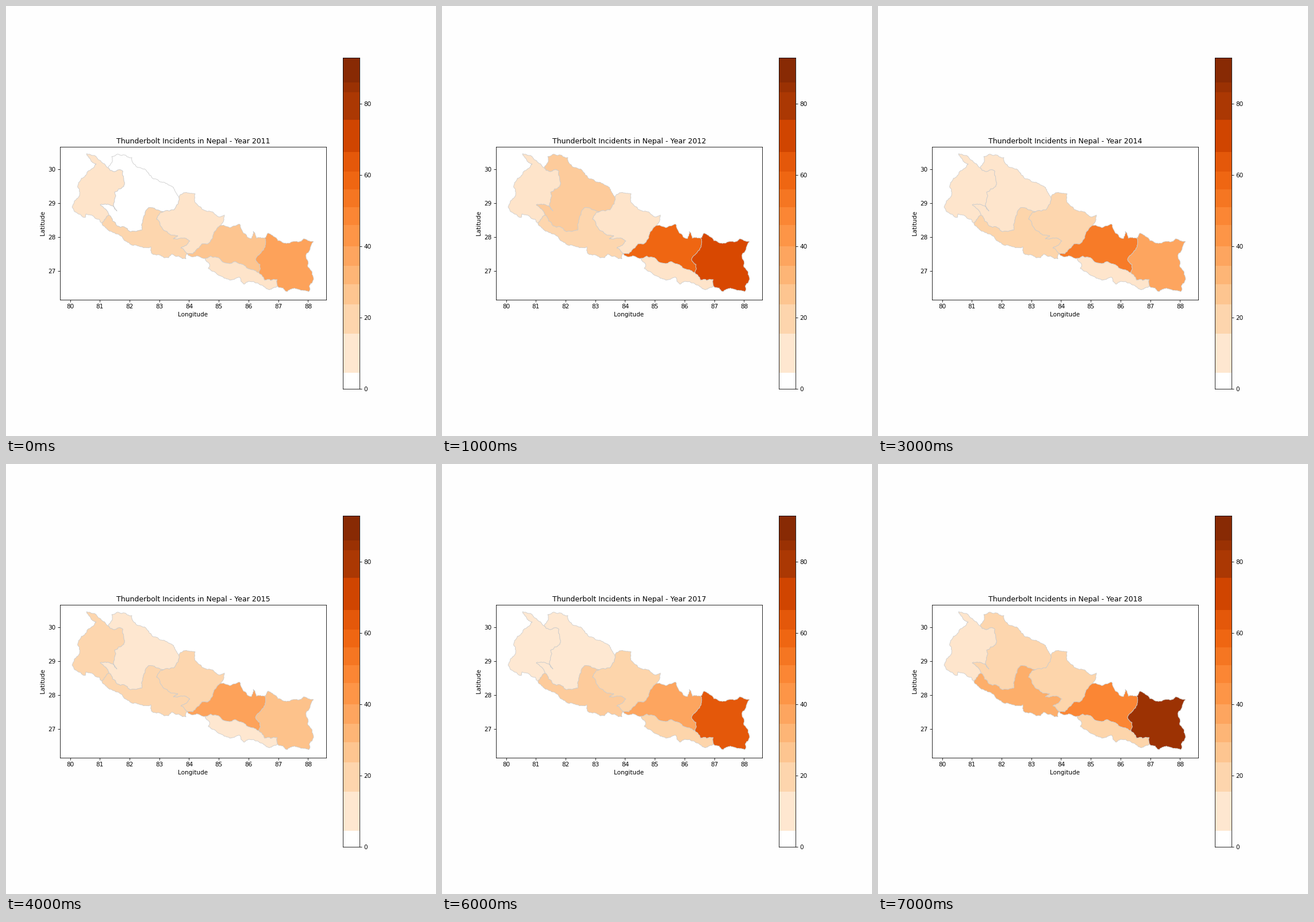
These frames come from a looping animation (748 px wide and 748 px high, 8000 ms). A matplotlib script:

```python
import numpy as np
import matplotlib.pyplot as plt
from matplotlib.animation import FuncAnimation
from matplotlib.patches import Polygon, Rectangle

VMAX = 93
rng = np.random.default_rng(7)
oranges = plt.get_cmap("Oranges")


def border(*points):
    """Roughen a line through a few key points by fractal midpoint shifts."""
    pts = np.array(points, float)
    for _ in range(4):
        step = np.diff(pts, axis=0)
        normal = np.column_stack([-step[:, 1], step[:, 0]])
        shift = rng.uniform(-0.16, 0.16, (len(step), 1))
        out = np.empty((2 * len(pts) - 1, 2))
        out[::2] = pts
        out[1::2] = pts[:-1] + step / 2 + normal * shift
        pts = out
    return pts


def geo(pts):
    """Stage pixels to longitude and latitude."""
    return np.column_stack([80 + (pts[:, 0] - 111.5) / 51.75,
                            30 - (pts[:, 1] - 284.4) / 58.82])


def ring(*lines):
    """Join borders end to end, turning each one to meet the last."""
    path = lines[0]
    for line in lines[1:]:
        if not np.allclose(path[-1], line[0]):
            line = line[::-1]
        path = np.vstack([path, line])
    return geo(path)


def shade(value):
    return oranges(value / VMAX) if value else "white"


# Outer borders
far_west = border(
    (178, 282), (164, 269), (140, 257), (157, 275), (146, 286), (131, 300),
    (125, 316), (126, 333), (115, 350), (138, 368), (139, 362), (167, 378))
karnali_north = border(
    (178, 282), (185, 271), (184, 262), (195, 258), (219, 264), (222, 275),
    (246, 289), (254, 299), (281, 310), (301, 333))
lumbini_south = border(
    (167, 378), (180, 392), (210, 410), (235, 419), (252, 419), (253, 430),
    (283, 438), (288, 432), (313, 440), (315, 431))
gandaki_north = border(
    (301, 333), (309, 325), (329, 327), (329, 342), (346, 356), (370, 367),
    (380, 364), (374, 382))
bagmati_north = border(
    (374, 382), (407, 380), (409, 388), (421, 403), (427, 405), (430, 392),
    (435, 404), (450, 404))
bagmati_tip = border((346, 439), (317, 434), (315, 431))
madhesh_south = border(
    (346, 439), (354, 449), (352, 457), (384, 475), (406, 472), (414, 484),
    (436, 482), (460, 493), (473, 488))
koshi_east = border(
    (450, 404), (456, 395), (480, 411), (511, 410), (518, 405), (535, 410),
    (525, 454), (535, 476), (526, 497), (501, 491), (489, 497), (473, 488))

# Borders shared by two provinces
sudur_lumbini = border((167, 378), (179, 364))
sudur_karnali = border(
    (179, 364), (164, 346), (186, 348), (193, 357), (187, 345), (189, 324),
    (205, 314), (203, 287), (187, 288), (178, 282))
karnali_gandaki = border((301, 333), (292, 355), (274, 358))
karnali_lumbini = border(
    (274, 358), (248, 351), (239, 368), (236, 390), (215, 392), (179, 364))
lumbini_gandaki = border(
    (315, 431), (304, 421), (320, 409), (291, 405), (299, 400), (271, 385),
    (262, 371), (274, 358))
gandaki_bagmati = border(
    (374, 382), (360, 400), (355, 411), (341, 414), (325, 431), (315, 431))
bagmati_koshi = border(
    (450, 404), (451, 418), (434, 441), (442, 450), (440, 464))
bagmati_madhesh = border(
    (440, 464), (417, 453), (381, 447), (367, 438), (346, 439))
madhesh_koshi = border((440, 464), (450, 477), (472, 476), (473, 488))

provinces = [
    ring(far_west, sudur_lumbini, sudur_karnali),
    ring(karnali_north, karnali_gandaki, karnali_lumbini, sudur_karnali),
    ring(lumbini_south, lumbini_gandaki, karnali_lumbini, sudur_lumbini),
    ring(gandaki_north, gandaki_bagmati, lumbini_gandaki, karnali_gandaki),
    ring(bagmati_north, bagmati_koshi, bagmati_madhesh, bagmati_tip,
         gandaki_bagmati),
    ring(bagmati_madhesh[::-1], madhesh_koshi, madhesh_south),
    ring(koshi_east, madhesh_koshi, bagmati_koshi),
]

# Incidents per province, west to east
incidents = {
    2011: (13, 0, 20, 13, 27, 13, 39),
    2012: (13, 25, 20, 13, 59, 13, 70),
    2013: (20, 13, 25, 21, 68, 21, 46),
    2014: (12, 12, 21, 20, 52, 12, 38),
    2015: (20, 11, 20, 20, 39, 11, 28),
    2016: (12, 12, 24, 20, 40, 20, 48),
    2017: (10, 10, 25, 21, 38, 21, 64),
    2018: (12, 20, 35, 21, 49, 21, 84),
}
years = list(incidents)

fig = plt.figure(figsize=(10, 10), dpi=74.8, facecolor="#fefefe")

ax = fig.add_axes([0.125, 0.11, 0.62, 0.77])
ax.set_xlim(79.652, 88.614)
ax.set_ylim(26.15, 30.671)
ax.set_aspect(1 / np.cos(np.radians(28.41)))
ax.set_xticks(range(80, 89))
ax.set_yticks(range(27, 31))
ax.set_xlabel("Longitude")
ax.set_ylabel("Latitude")
title = ax.set_title("")
shapes = [ax.add_patch(Polygon(outline, edgecolor="0.8", linewidth=0.8))
          for outline in provinces]

bar = fig.add_axes([0.78375, 0.11, 0.0385, 0.77])
bar.set_ylim(0, VMAX)
bar.set_xticks([])
bar.yaxis.tick_right()
bar.set_yticks(range(0, 81, 20))
levels = [0, 4.5, 15.4, 23.7, 29.3, 34.5, 40, 46, 51, 56, 61, 66.5,
          75.5, 83.3, 86, VMAX]
for low, high in zip(levels, levels[1:]):
    tone = shade(low and low + 0.6 * (high - low))
    bar.add_patch(Rectangle((0, low), 1, high - low, facecolor=tone,
                            linewidth=0, antialiased=False))


def draw(i):
    year = years[i]
    title.set_text(f"Thunderbolt Incidents in Nepal - Year {year}")
    for shape, value in zip(shapes, incidents[year]):
        shape.set_facecolor(shade(value))
    return [title, *shapes]


anim = FuncAnimation(fig, draw, frames=len(years), interval=1000,
                     repeat=True, repeat_delay=0, blit=False)
plt.show()
```
